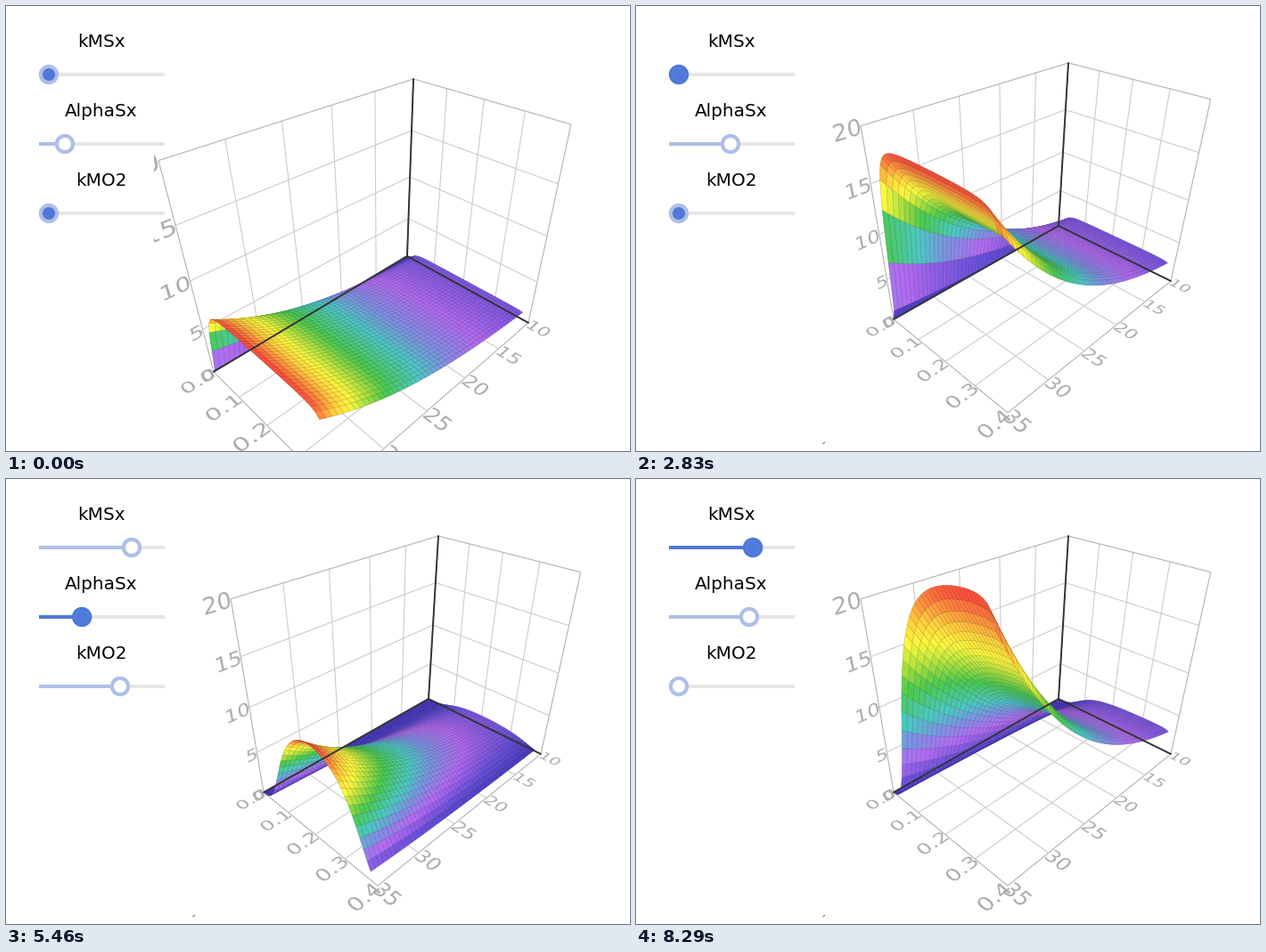
A matplotlib script that plays this animation: 700 px wide and 500 px high, repeating every 8.33 s.

```python
import numpy as np
import matplotlib.pyplot as plt
from matplotlib.animation import FuncAnimation
from matplotlib.collections import LineCollection, PolyCollection
from matplotlib.colors import LinearSegmentedColormap
from matplotlib.patches import Circle, PathPatch, Rectangle
from matplotlib.path import Path
from matplotlib.textpath import TextPath

W, H, DPI = 700, 500, 100
FRAMES, LOOP = 200, 8330
PX = 72 / DPI
FONT = "DejaVu Sans"

ACTIVE, DIMMED, TRACK = "#4f78d9", "#aebfe7", "#e5e6e6"

# Projective cameras acting on unit-cube coordinates (u, v, w, 1).
CAM_START = np.array([[47.5, -271.8, -79.8, 450],
                      [21.2, 33.4, -214.6, 281],
                      [-.151, -.235, -.19, 1]])
CAM_END = np.array([[42.7, -246.8, -72.4, 474],
                    [19.1, 29.7, -194, 247],
                    [-.1388, -.214, -.172, 1]])

RAINBOW = LinearSegmentedColormap.from_list("rainbow_z", [
    (0, "#4438bd"), (.09, "#6a50dc"), (.2, "#b36af2"), (.3, "#7f90e4"),
    (.4, "#4cc8c4"), (.55, "#4ac94e"), (.64, "#a3de3f"), (.74, "#fbf83e"),
    (.83, "#ffd03c"), (.91, "#ff8a3c"), (1, "#f9403a")])


def camera(t):
    pan_t = [0, 40, 500, 850]
    dx = np.interp(t, pan_t, [0, 0, 28, 36])
    dy = np.interp(t, pan_t, [0, 0, -51, -38])
    panned = CAM_START.copy()
    panned[0] += dx * CAM_START[2]
    panned[1] += dy * CAM_START[2]
    k = np.interp(t, [850, 1030], [0, 1])
    return panned * (1 - k) + CAM_END * k


def project(cam, pts):
    """Return pixel positions and depths of points in the unit cube."""
    q = pts @ cam[:, :3].T + cam[:, 3]
    return q[..., :2] / q[..., 2:], q[..., 2]


# --- surface -------------------------------------------------------------
U, V = np.meshgrid(np.linspace(0, .95, 39), np.linspace(0, 1, 51),
                   indexing="ij")


def surface(km_sx, alpha, km_o2):
    """Growth rate surface from the three knob positions in pixels."""
    top = .0139 * (alpha - 37)
    k_s = 2e-4 + 1.65e-4 * (km_sx - 48)
    k_o = .02 + .18 * (km_o2 - 48) / 80
    oxygen = (1.01 - U) ** 2
    return (top * U**3 / (k_s + U**3) * oxygen / (k_o**2 + oxygen)
            * np.exp(2.15 * (V - 1)))


def corners(a):
    return np.stack([a[:-1, :-1], a[1:, :-1], a[1:, 1:], a[:-1, 1:]], axis=2)


# --- sliders -------------------------------------------------------------
class Slider:
    def __init__(self, name, y, keys, grabs, touched):
        self.keys, self.grabs, self.touched = keys, grabs, touched
        self.y = y
        ax.text(107, y - 31.5, name, family=FONT, size=20 * PX,
                ha="center", va="baseline")
        ax.plot([37, 178], [y, y], color=TRACK, lw=4 * PX,
                solid_capstyle="butt")
        self.line, = ax.plot([], [], lw=4 * PX, solid_capstyle="butt")
        self.knob = ax.add_patch(Circle((0, y), 11.2, lw=0, zorder=3))
        self.core = ax.add_patch(Circle((0, y), 7, lw=0, zorder=4))
        self.ring = ax.add_patch(Circle((0, y), 7, fill=False, ls=":",
                                        lw=.7 * PX, ec="#7d9be6", zorder=5))

    def value(self, t):
        return np.interp(t, *zip(*self.keys))

    def update(self, t):
        x = self.value(t)
        hover = any(a <= t < c for a, _, c in self.grabs)
        drag = any(b <= t < c for _, b, c in self.grabs)
        for part in (self.knob, self.core, self.ring):
            part.center = x, self.y
        self.line.set_data([37, x], [self.y, self.y])
        self.line.set_color(ACTIVE if drag else DIMMED)
        self.knob.set_facecolor(ACTIVE if hover else DIMMED)
        white = not hover and t >= self.touched
        self.core.set_facecolor("white" if white else ACTIVE)
        self.ring.set_visible(hover)


# --- box, grid and tick labels -------------------------------------------
def grid_segments():
    segs = []
    us, vs, ws = (np.linspace(0, 1, n) for n in (5, 6, 5))
    for u in us:
        segs += [[(u, 0, 0), (u, 1, 0)], [(u, 0, 0), (u, 0, 1)]]
    for v in vs:
        segs += [[(0, v, 0), (1, v, 0)], [(0, v, 0), (0, v, 1)]]
    for w in ws:
        segs += [[(0, 0, w), (1, 0, w)], [(0, 0, w), (0, 1, w)]]
    return np.array(segs, float)


def label(text, origin, right, up, flush_right):
    path = TextPath((0, 0), text, size=1, prop={"family": FONT})
    xy = path.vertices.copy()
    if flush_right:
        xy[:, 0] -= xy[:, 0].max() + .05
    xy[:, 1] -= .36
    pts = np.array(origin, float) + xy @ np.array([right, up], float)
    return pts, path.codes


def tick_labels():
    em_u, em_v, em_w = (.112, 0, 0), (0, -.078, 0), (0, 0, .09)
    up_u = (-.112, 0, 0)
    parts = []
    for i in range(5):
        parts.append(label(f"{i / 10:.1f}", (i / 4, 1, 0), em_v, up_u, True))
        parts.append(label(str(5 * i), (0, 1, i / 4), em_v, em_w, True))
    for i in range(6):
        parts.append(label(str(10 + 5 * i), (1, i / 5, 0), em_u, em_v, False))
    return (np.concatenate([p for p, _ in parts]),
            np.concatenate([c for _, c in parts]))


fig = plt.figure(figsize=(W / DPI, H / DPI), dpi=DPI, facecolor="white")
ax = fig.add_axes([0, 0, 1, 1])
ax.axis("off")

GRID = grid_segments()
AXES = np.array([[(0, 0, 0), p] for p in np.eye(3)])
LABEL_PTS, LABEL_CODES = tick_labels()
on_rim = [np.any((s == 1).all(axis=0)) or
          np.sum((s == 0).all(axis=0)) == 2 for s in GRID]

grid = LineCollection([], linewidths=1.1 * PX, zorder=1,
                      colors=["#b2b2b2" if r else "#cccccc" for r in on_rim])
mesh = PolyCollection([], linewidths=.5 * PX, zorder=2)
axes3d = LineCollection([], colors="#333333", linewidths=1.9 * PX, zorder=4,
                        capstyle="round")
labels = PathPatch(Path(np.zeros((1, 2))), fc="#adadad", lw=0, zorder=1.5)
view = Rectangle((166, 0), W - 166, H, transform=ax.transData)
for artist in (grid, mesh, axes3d, labels):
    ax.add_artist(artist)
    artist.set_clip_path(view)

speck, = ax.plot([210, 211.5], [491.5, 490.5], color="#555555", lw=1 * PX)

km_sx = Slider("kMSx", 77,
               [(2850, 48), (3550, 141), (7700, 141), (7960, 152),
                (8290, 131)],
               [(2700, 2850, 3680), (7480, 7650, 9000)], 2850)
alpha = Slider("AlphaSx", 155,
               [(1870, 66), (2050, 58), (2600, 106), (4980, 106),
                (5330, 90), (5460, 85), (5600, 72), (6190, 127)],
               [(1700, 1870, 2640), (4880, 4960, 6285)], 0)
km_o2 = Slider("kMO2", 233,
               [(4050, 48), (4750, 128), (6550, 128), (7200, 48)],
               [(1210, 9000, 1370), (3850, 4050, 4800), (6450, 6550, 7300)],
               4050)
# The passing hover never becomes a drag.
sliders = (km_sx, alpha, km_o2)

ax.set_xlim(0, W)
ax.set_ylim(H, 0)


def draw(i):
    t = i * LOOP / FRAMES
    cam = camera(t)
    for s in sliders:
        s.update(t)

    z = surface(*(s.value(t) for s in sliders))
    xy, depth = project(cam, np.stack([U, V, z], axis=-1))
    quads = corners(xy).reshape(-1, 4, 2)
    order = np.argsort(-corners(depth).mean(axis=2).ravel())
    height = corners(z).mean(axis=2).ravel()[order] / z.max()
    faces = RAINBOW(height)
    edges = faces.copy()
    edges[:, :3] *= .78
    mesh.set_verts(quads[order])
    mesh.set_facecolor(faces)
    mesh.set_edgecolor(edges)

    grid.set_segments(project(cam, GRID)[0])
    axes3d.set_segments(project(cam, AXES)[0])
    labels.set_path(Path(project(cam, LABEL_PTS)[0], LABEL_CODES))
    speck.set_visible(t > 900)
    return mesh, grid, axes3d, labels


anim = FuncAnimation(fig, draw, frames=FRAMES, interval=LOOP / FRAMES,
                     repeat=True, repeat_delay=0, blit=False)
plt.show()
```
